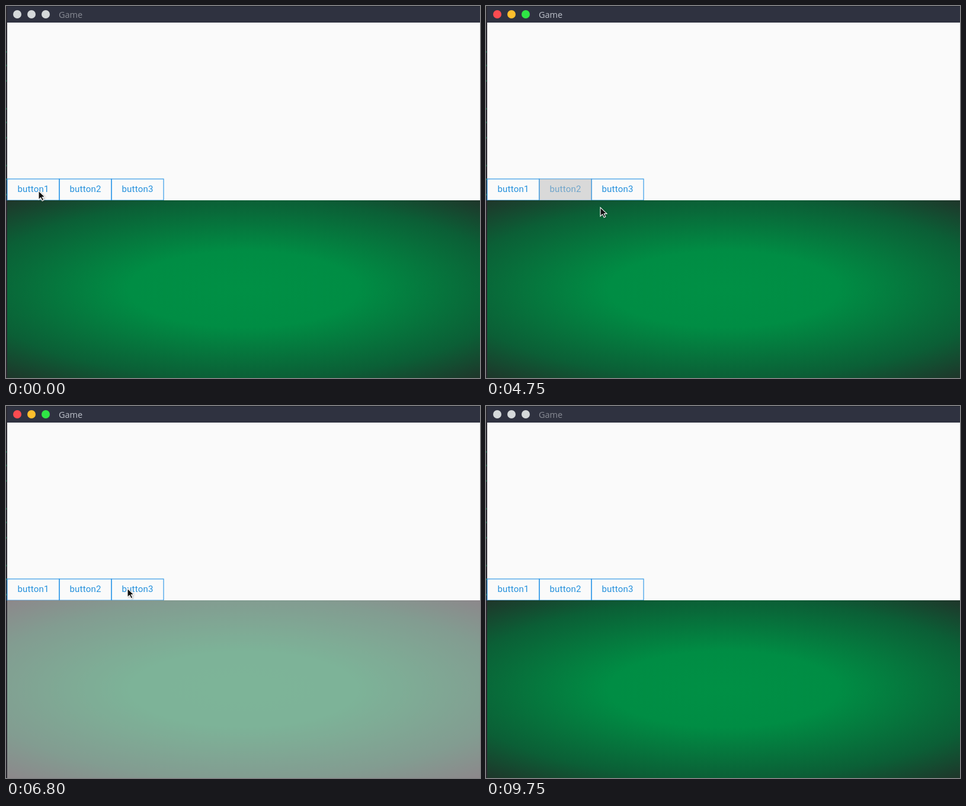
Recreate the animation shown at these times as an HTML page with a canvas. Size 800x628 px, loop 9.85 s.

```html
<!DOCTYPE html>
<html>
<head>
<meta charset="utf-8">
<style>
  html, body { margin: 0; width: 800px; height: 628px; overflow: hidden; }
  canvas { display: block; }
</style>
</head>
<body>
<canvas id="stage" width="800" height="628"></canvas>
<script>
const ctx = document.getElementById('stage').getContext('2d');
const LOOP = 9850, STEP = 50;
const PANEL_TOP = 328, BUTTON_WIDTH = 88, BUTTON_TOP = 292, BUTTON_HEIGHT = 36;

// button2 shows the panel and stays shaded until button3 hides it: [shown, hidden]
const rounds = [[2950, 5100], [6200, 6600], [7450, 9400]];

// Pointer stops: time, x, y
const stops = [
  [0, 55, 312], [900, 66, 312], [1300, 52, 298], [2250, 66, 314], [2950, 153, 317],
  [3250, 153, 317], [4750, 193, 340], [5100, 227, 315], [5750, 227, 315],
  [6200, 140, 312], [6550, 214, 310], [6800, 205, 308], [7450, 96, 307],
  [8900, 120, 312], [9600, -14, 318]
];

const clamp = v => Math.max(0, Math.min(1, v));
const ramp = (t, start, length) => clamp((t - start) / length);
const smooth = v => v * v * (3 - 2 * v);

function pointerAt(t) {
  const i = stops.findIndex(s => s[0] > t);
  if (i < 0) return null;
  const [t0, x0, y0] = stops[i - 1], [t1, x1, y1] = stops[i];
  const p = smooth(ramp(t, t0, t1 - t0));
  return [x0 + (x1 - x0) * p, y0 + (y1 - y0) * p];
}

// 0 = panel shown, 1 = panel hidden
const veilAt = t => rounds.slice(1).reduce((veil, [shown], i) =>
  veil + ramp(t, rounds[i][1], 400) - ramp(t, shown + 50, 400), 0);

function rect(x, y, w, h, color) {
  ctx.fillStyle = color;
  ctx.fillRect(x, y, w, h);
}

function circle(x, y, r, color) {
  ctx.fillStyle = color;
  ctx.beginPath();
  ctx.arc(x, y, r, 0, 7);
  ctx.fill();
}

function text(str, x, y, font, color, align) {
  ctx.font = font;
  ctx.textAlign = align;
  ctx.fillStyle = color;
  ctx.fillText(str, x, y);
}

function clipped(x, y, w, h, draw) {
  ctx.save();
  ctx.beginPath();
  ctx.rect(x, y, w, h);
  ctx.clip();
  draw();
  ctx.restore();
}

function drawWindow(focused) {
  rect(0, 0, 800, 628, '#fafafa');
  rect(0, 0, 800, 28, '#2f3240');
  rect(0, 0, 800, 1, '#22252e');
  rect(0, 0, 2, 628, '#2a2830');
  for (let y = 76; y < 320; y += 96)
    for (const offset of [0, 23, 49]) rect(0, y + offset, 1, 3, '#1d7a55');
  ['#fc4b50', '#fdbe2d', '#2fe545'].forEach((color, i) =>
    circle(19 + 24 * i, 14, 7, focused ? color : '#d5d9da'));
  text('Game', 89, 20, '14.5px "Open Sans", sans-serif', focused ? '#bfc3cc' : '#898c95', 'left');
}

const felt = ctx.createRadialGradient(0, 0, 0, 0, 0, 1.34);
felt.addColorStop(0, '#009045');
felt.addColorStop(.32, '#008d44');
felt.addColorStop(.75, '#0b5f36');
felt.addColorStop(1, '#1f352a');

function drawPanel(veil) {
  if (veil >= 1) {
    rect(2, PANEL_TOP + 1, 265, 1, '#eef2f4');
    return;
  }
  clipped(2, PANEL_TOP, 798, 300, () => {
    ctx.translate(401, 478);
    ctx.scale(450, 150);
    rect(-1, -1, 2, 2, felt);
  });
  const dip = Math.sin(Math.PI * veil);
  rect(2, PANEL_TOP, 798, 300, `rgba(250,${250 - 33 * dip},${250 - 15 * dip},${veil})`);
}

function drawButtons(t) {
  ctx.strokeStyle = '#2191e6';
  ctx.lineWidth = 1.1;
  ctx.letterSpacing = '0.2px';
  for (let i = 0; i < 3; i++) {
    const x = 2 + BUTTON_WIDTH * i;
    ctx.strokeRect(x, BUTTON_TOP, BUTTON_WIDTH, BUTTON_HEIGHT);
    text('button' + (i + 1), x + 44, 314, '15px Roboto, sans-serif', '#2490dc', 'center');
  }
  ctx.letterSpacing = '0px';
}

function drawShade(t) {
  for (const [down, up] of rounds) {
    if (t < down) continue;
    const age = t - down;
    const shade = (.15 + .35 * clamp(age / 250)) * (1 - ramp(t, up, 150));
    const [x, y] = pointerAt(down);
    clipped(90, BUTTON_TOP, BUTTON_WIDTH, BUTTON_HEIGHT, () => {
      rect(90, BUTTON_TOP, BUTTON_WIDTH, BUTTON_HEIGHT, `rgba(186,186,186,${shade})`);
      if (age < 300) circle(x, y + 1, 2 + age * .12, 'rgba(150,160,160,.3)');
    });
  }
}

const arrow = new Path2D('M0 0V15L3.6 11.6L6.2 17L8.8 15.8L6.3 10.6H11Z');

function drawPointer(pos) {
  if (!pos) return;
  ctx.save();
  ctx.translate(Math.round(pos[0]), Math.round(pos[1]));
  ctx.shadowColor = 'rgba(0,0,0,.45)';
  ctx.shadowBlur = 3;
  ctx.shadowOffsetX = ctx.shadowOffsetY = 1;
  ctx.fillStyle = '#111';
  ctx.fill(arrow);
  ctx.shadowColor = 'transparent';
  ctx.strokeStyle = '#fff';
  ctx.lineWidth = 1.1;
  ctx.stroke(arrow);
  ctx.restore();
}

function frame(now) {
  const t = Math.floor(now % LOOP / STEP) * STEP;
  drawWindow(t >= 700 && t < 9650);
  drawButtons();
  drawShade(t);
  drawPanel(veilAt(t));
  drawPointer(pointerAt(t));
  requestAnimationFrame(frame);
}
frame(0);
</script>
</body>
</html>
```
